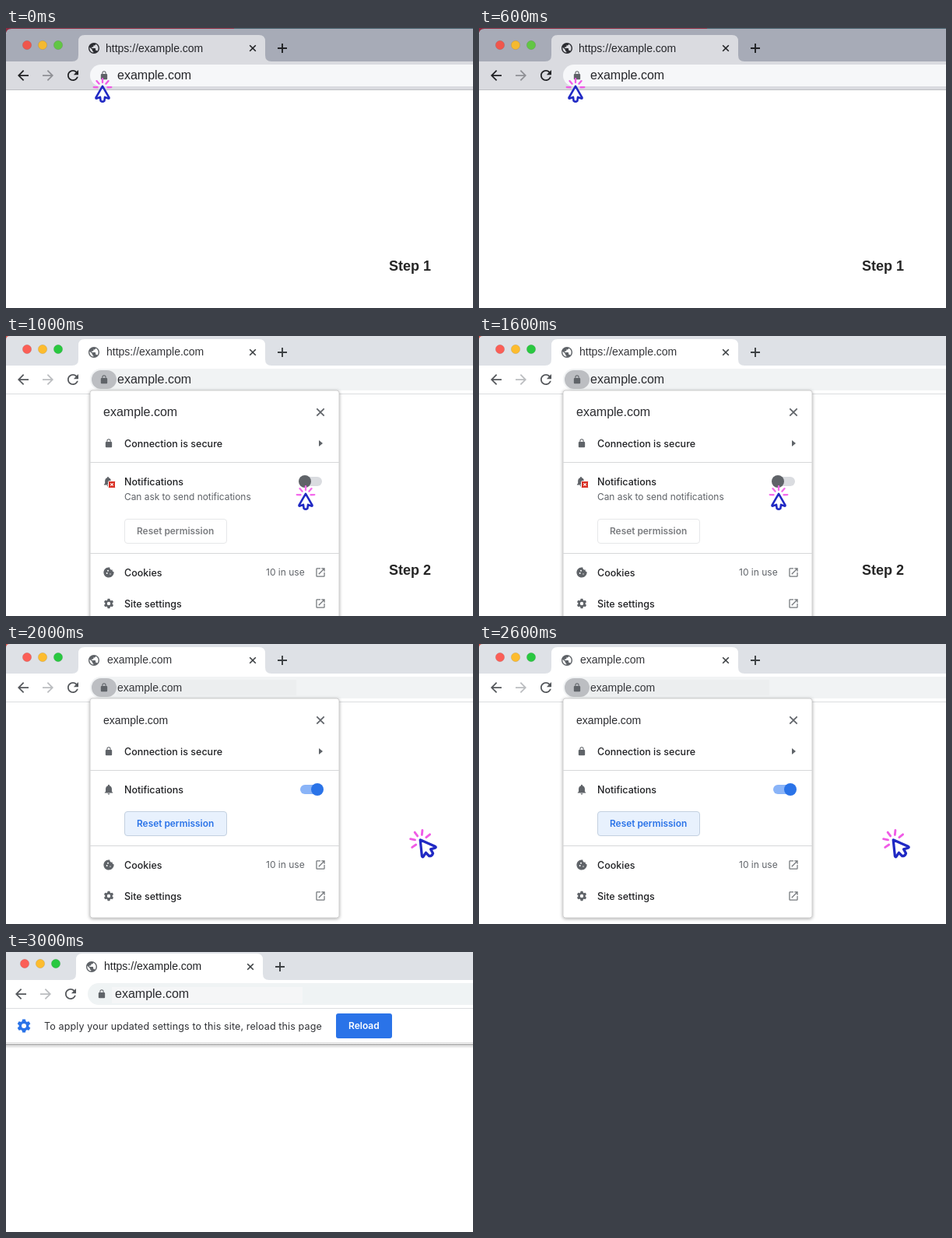
Recreate the animation shown at these times as an HTML page. Size 600x360 px, loop 4 s.

```html
<!DOCTYPE html>
<html lang="en">
<head>
<meta charset="utf-8">
<title>Site notification settings</title>
<style>
  html, body { margin: 0; width: 100%; height: 100%; overflow: hidden; background: #fff; }
  svg { display: block; width: 600px; height: 360px; }
  text { white-space: pre; }
  .web { font-family: "Liberation Sans", Arial, sans-serif; }
  .ui { font-family: Inter, Roboto, sans-serif; }
</style>
</head>
<body>
<svg id="stage" viewBox="0 0 600 360" xmlns="http://www.w3.org/2000/svg">
  <defs>
    <filter id="shadow" x="-10%" y="-10%" width="120%" height="120%">
      <feDropShadow dx="0" dy="1" stdDeviation="2.2" flood-color="#000" flood-opacity=".36"/>
    </filter>
    <linearGradient id="fade" x1="0" y1="0" x2="0" y2="1">
      <stop offset="0" stop-color="#a2a2a2"/>
      <stop offset=".35" stop-color="#d8d8d8"/>
      <stop offset="1" stop-color="#fff"/>
    </linearGradient>
  </defs>
</svg>
<script>
const STEP = 1000;
const stage = document.getElementById('stage');

// Icons on a 24-unit grid
const ICONS = {
  back: 'M20 11H7.83l5.59-5.59L12 4l-8 8 8 8 1.41-1.41L7.83 13H20z',
  reload: 'M17.65 6.35C16.2 4.9 14.21 4 12 4c-4.42 0-8 3.58-8 8s3.58 8 8 8c3.73 0 6.84-2.55 7.73-6h-2.08c-.82 2.33-3.04 4-5.65 4-3.31 0-6-2.69-6-6s2.69-6 6-6c1.66 0 3.14.69 4.22 1.78L13 11h7V4z',
  globe: 'M12 2C6.48 2 2 6.48 2 12s4.48 10 10 10 10-4.48 10-10S17.52 2 12 2zm-1 17.93c-3.95-.49-7-3.85-7-7.93 0-.62.08-1.21.21-1.79L9 15v1c0 1.1.9 2 2 2zm6.9-2.54c-.26-.81-1-1.39-1.9-1.39h-1v-3c0-.55-.45-1-1-1H8v-2h2c.55 0 1-.45 1-1V7h2c1.1 0 2-.9 2-2v-.41c2.93 1.19 5 4.06 5 7.41 0 2.08-.8 3.97-2.1 5.39z',
  lock: 'M18 8h-1V6A5 5 0 0 0 7 6v2H6a2 2 0 0 0-2 2v10a2 2 0 0 0 2 2h12a2 2 0 0 0 2-2V10a2 2 0 0 0-2-2zm-2.9 0H8.9V6a3.1 3.1 0 0 1 6.2 0z',
  bell: 'M12 22c1.1 0 2-.9 2-2h-4c0 1.1.89 2 2 2zm6-6v-5c0-3.07-1.64-5.64-4.5-6.32V4a1.5 1.5 0 0 0-3 0v.68C7.63 5.36 6 7.92 6 11v5l-2 2v1h16v-1z',
  cookie: 'M21.95 11c-1.79 0-3.7-1.95-2.68-4.22-2.97 1-5.78-1.59-5.19-4.56C7.11.74 2 6.41 2 12c0 5.52 4.48 10 10 10 5.89 0 10.54-5.08 9.95-11zM8.5 15a1.5 1.5 0 1 1 0-3 1.5 1.5 0 0 1 0 3zm2-5a1.5 1.5 0 1 1 0-3 1.5 1.5 0 0 1 0 3zm4.5 6a1 1 0 1 1 0-2 1 1 0 0 1 0 2z',
  open: 'M19 19H5V5h7V3H5a2 2 0 0 0-2 2v14a2 2 0 0 0 2 2h14a2 2 0 0 0 2-2v-7h-2zM14 3v2h3.59l-9.83 9.83 1.41 1.41L19 6.41V10h2V3z'
};

const rect = (x, y, w, h, fill, more = '') =>
  `<rect x="${x}" y="${y}" width="${w}" height="${h}" fill="${fill}" ${more}/>`;
const circle = (x, y, r, fill, more = '') =>
  `<circle cx="${x}" cy="${y}" r="${r}" fill="${fill}" ${more}/>`;
const path = (d, fill, more = '') => `<path d="${d}" fill="${fill}" ${more}/>`;
const line = (d, color, width, more = '') =>
  path(d, 'none', `stroke="${color}" stroke-width="${width}" ${more}`);
const group = (transform, body) => `<g transform="${transform}">${body}</g>`;
const text = (cls, x, y, size, weight, fill, str, more = '') =>
  `<text class="${cls}" x="${x}" y="${y}" font-size="${size}" font-weight="${weight}" fill="${fill}" ${more}>${str}</text>`;
const web = (x, y, size, fill, str, weight = 400) => text('web', x, y, size, weight, fill, str);
const ui = (x, y, size, weight, fill, str, more) => text('ui', x, y, size, weight, fill, str, more);

const icon = (name, x, y, scale, fill, flip = 1) =>
  group(`translate(${x} ${y}) scale(${scale * flip} ${scale}) translate(-12 -12)`, path(ICONS[name], fill));
const cross = (x, y, r, color, width) =>
  line(`M${x - r} ${y - r}l${2 * r} ${2 * r}m0 ${-2 * r}l${-2 * r} ${2 * r}`, color, width);

function gear(x, y, scale, color) {
  let body = circle(0, 0, 5.5, 'none', `stroke="${color}" stroke-width="3.9"`);
  for (let a = 0; a < 360; a += 60)
    body += group(`rotate(${a})`, path('M-3.2-6L-2.2-10H2.2L3.2-6z', color));
  return group(`translate(${x} ${y}) scale(${scale})`, body);
}

function pointer(x, y, scale, turn, pink) {
  let body = '';
  for (const a of [-88, -42, 0, 42, 88])
    body += group(`translate(0 2) rotate(${a})`, line('M0-6.5V-11.3', pink, 2.3, 'stroke-linecap="round"'));
  body += path('M0 .3L8.4 14.8Q9 16.4 7.4 16L3 14.4L2.4 19.2Q0 21 -2.4 19.2L-3 14.4L-7.4 16Q-9 16.4-8.4 14.8z',
    '#fff', 'stroke="#2029c4" stroke-width="2.6" stroke-linejoin="round"');
  return group(`translate(${x} ${y}) rotate(${turn}) scale(${scale})`, body);
}

function browser(dx, dy, c) {
  const lights = c.lights.map((fill, i) =>
    circle(27 + 20 * i, 22, 5.7, fill, 'stroke="#000" stroke-opacity=".13" stroke-width=".7"')).join('');
  return group(`translate(${dx} ${dy})`,
    lights +
    path('M85 43q8 0 8-8V17q0-8 8-8H325q8 0 8 8V35q0 8 8 8z', c.tab) +
    rect(0, 43, 610, 36, c.tab) +
    rect(0, 79, 610, 1, c.edge) +
    icon('globe', 113, 26, .7, c.globe) +
    cross(317, 26, 3.8, c.ink, 1.6) +
    line('M349 26h12m-6-6v12', c.ink, 1.9) +
    icon('back', 22, 61, .875, c.arrow) +
    icon('back', 54, 61, .875, c.dim, -1) +
    icon('reload', 86, 61, .875, c.arrow) +
    rect(108, 47, 520, 28, c.field, 'rx="14"'));
}

const LIGHT = {
  lights: ['#fb5f57', '#fdbc2e', '#29c840'], tab: '#fff', edge: '#dcdddf', globe: '#5f6368',
  ink: '#3c4043', arrow: '#54575b', dim: '#bbbdc0', field: '#f1f3f4'
};
const DIM = {
  lights: ['#f0564c', '#f4b92f', '#62c644'], tab: '#dadbe0', edge: '#bfc0c4', globe: '#2b2c31',
  ink: '#202124', arrow: '#202124', dim: '#8f9095', field: '#f6f7f9'
};
const INK = '#202124', GREY = '#5f6368', BLUE = '#2a73e8';

const lightWindow = () =>
  rect(0, 0, 5, 5, '#e0584f') +
  path('M0 5Q0 0 5 0H600V40H0z', '#dee1e6') +
  browser(0, -5, LIGHT) +
  rect(110, 44, 32, 24, '#bcbec2', 'rx="12"') +
  icon('lock', 126, 56, .52, GREY);

function panel(height, low, size) {
  const row = (y, label) => ui(152, y + 5, 12.5, 500, INK, label);
  return rect(108, 70, 320, height, '#fff', 'rx="3" filter="url(#shadow)" stroke="#b4b4b4" stroke-width=".6"') +
    web(125, 103, size, '#2b2c30', 'example.com') +
    cross(404, 98, 4.7, GREY, 1.7) +
    icon('lock', 132, 138, .52, GREY) + row(138, 'Connection is secure') +
    path('M402 134l5 4-5 4z', GREY) +
    rect(108, 162, 320, 1, '#d6d7d9') +
    row(187, 'Notifications') +
    rect(108, low - 25, 320, 1, '#d6d7d9') +
    icon('cookie', 132, low, .66, GREY) + row(low, 'Cookies') +
    ui(334, low + 4, 12, 400, GREY, '10 in use') +
    icon('open', 404, low, .63, '#74787c') +
    gear(132, low + 40, .62, GREY) + row(low + 40, 'Site settings') +
    icon('open', 404, low + 40, .63, '#74787c');
}

const toggle = (knob, track, fill) =>
  rect(378, 181, 28, 12, track, 'rx="6"') + circle(knob, 187, 8, fill);
const resetButton = (y, fill, border, color) =>
  rect(152.5, y + .5, 131, 31, fill, `rx="3.5" stroke="${border}"`) +
  ui(168, y + 20, 11.9, 600, color, 'Reset permission');

const scenes = [
  rect(0, 0, 293, 6, '#8d2b40') + rect(293, 0, 307, 6, '#45606c') +
  path('M0 8Q0 1 7 1H600V44H0z', '#a7abb7') +
  browser(0, 0, DIM) +
  web(128, 31, 14, '#25262a', 'https://example.com') +
  icon('lock', 126, 61, .52, GREY) +
  web(143, 66, 16, '#25262a', 'example.com') +
  web(492, 312, 18, '#252525', 'Step 1', 700) +
  pointer(124, 74.5, 1, 0, '#f05be6'),

  lightWindow() +
  web(129, 25, 14, '#35363a', 'https://example.com') +
  web(143, 61, 16, '#2b2c30', 'example.com') +
  panel(310, 304, 16) +
  icon('bell', 131, 187, .64, GREY) +
  rect(131.5, 186.5, 9, 9, '#d93025', 'rx="1" stroke="#fff"') +
  cross(136, 191, 1.7, '#fff', 1.2) +
  ui(152, 211, 11.9, 400, GREY, 'Can ask to send notifications') +
  toggle(384, '#dadce0', GREY) +
  resetButton(235, '#fff', '#e6e7e9', '#7b7d80') +
  web(492, 307, 18, '#252525', 'Step 2', 700) +
  pointer(385, 202.5, 1, 0, '#f46cec'),

  lightWindow() +
  rect(142, 46, 231, 20, '#eceeef') +
  web(130, 25, 14, '#35363a', 'example.com') +
  web(143, 61, 14, '#35363a', 'example.com') +
  panel(282, 284, 14) +
  icon('bell', 132, 187, .66, GREY) +
  toggle(400, '#8ab4f8', BLUE) +
  resetButton(215, '#e8f1fd', '#c3d0e0', BLUE) +
  pointer(532, 251.5, 1.25, -36, '#f05be6'),

  rect(0, 0, 600, 37, '#dee1e6') +
  browser(-3, -7, { ...LIGHT, field: '#eff3f4' }) +
  rect(136, 45, 245, 21, '#f5f6f7') +
  web(126, 23, 14, '#202124', 'https://example.com') +
  icon('lock', 123, 54, .52, GREY) +
  web(140, 59, 16, '#2b2c30', 'example.com') +
  gear(23, 95, .85, BLUE) +
  ui(49, 100, 12.5, 400, '#303236', 'To apply your updated settings to this site, reload this page', 'letter-spacing=".13"') +
  rect(424, 79, 72, 32, BLUE, 'rx="3"') +
  ui(440, 99, 12, 600, '#fff', 'Reload') +
  rect(0, 116, 600, 1, '#dcdcdc') +
  rect(0, 118, 600, 6, 'url(#fade)')
];

stage.insertAdjacentHTML('beforeend', scenes.map(s => `<g class="scene">${s}</g>`).join(''));
const layers = [...stage.querySelectorAll('.scene')];

function draw(ms) {
  const current = Math.floor(ms / STEP) % layers.length;
  layers.forEach((layer, i) => { layer.style.display = i === current ? '' : 'none'; });
}

const start = performance.now();
function tick() {
  draw(performance.now() - start);
  requestAnimationFrame(tick);
}
tick();
</script>
</body>
</html>
```
